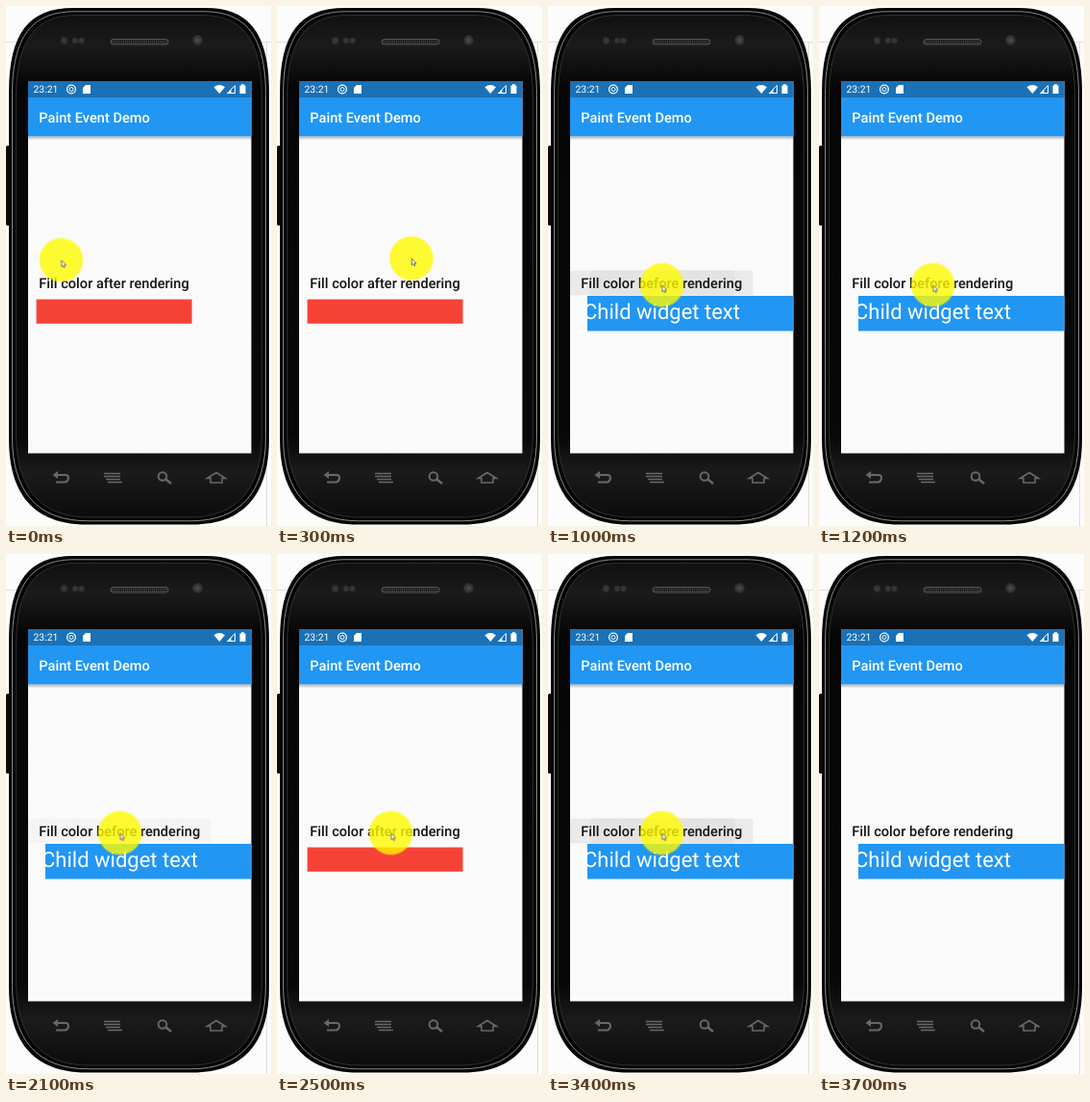
An HTML page for the animation above (4.8 s loop, 276 by 540 pixels).

```html
<!DOCTYPE html>
<html lang="en">
<head>
<meta charset="utf-8">
<title>Paint Event Demo</title>
<style>
html, body { margin: 0; width: 100%; height: 100%; overflow: hidden; background: #fafafa; }
svg { display: block; width: 100%; height: 100%; }
text { font-family: Roboto, sans-serif; text-rendering: geometricPrecision; }
.label { font-size: 14.6px; font-weight: 500; fill: #141414; }

.after, .before, .press, .splash, .pointer { animation: 4800ms step-end infinite; }
.after { animation-name: after; }
.before { animation-name: before; }
.press { animation-name: press; fill: #bcbcbc; }
.splash { animation-name: splash; fill: #c8c8c8; }
.pointer { animation-name: pointer; }

@keyframes after {
  0%, 47.91% { opacity: 1; }
  20.83%, 70.83%, 100% { opacity: 0; }
}
@keyframes before {
  0%, 47.91% { opacity: 0; }
  20.83%, 70.83%, 100% { opacity: 1; }
}
@keyframes press {
  0%, 25%, 52.08%, 77.08%, 100% { opacity: 0; }
  18.75%, 45.83% { opacity: .3; }
  20.83%, 47.91%, 70.83% { opacity: .26; }
  22.91%, 50%, 72.91% { opacity: .12; }
  43.75% { opacity: .09; }
  66.66% { opacity: .22; }
  68.75% { opacity: .36; }
  75% { opacity: .04; }
}
@keyframes splash {
  0%, 25%, 43.75%, 52.08%, 66.66%, 75%, 100% { opacity: 0; r: 0; }
  18.75%, 45.83%, 68.75% { opacity: .25; r: 48px; }
  20.83%, 47.91%, 70.83% { opacity: .2; r: 76px; }
  22.91%, 50%, 72.91% { opacity: .08; r: 100px; }
}
@keyframes pointer {
  0% { transform: translate(57.5px, 263.7px); opacity: 1; }
  2.08% { transform: translate(66px, 257px); }
  4.16% { transform: translate(95px, 255px); }
  6.25% { transform: translate(140px, 262px); }
  8.33% { transform: translate(168px, 274px); }
  10.41% { transform: translate(143px, 287px); }
  12.5% { transform: translate(121px, 290px); }
  14.58% { transform: translate(118.6px, 289.6px); opacity: 1; }
  77.08%, 100% { transform: translate(118.6px, 289.6px); opacity: 0; }
}
</style>
</head>
<body>
<svg viewBox="0 0 276 540">
  <defs>
    <path id="body" d="M3 90C3 28 24 2 70 2H208C253 2 274 28 274 90V450C274 508 247 538.500 194 538.500H84C30 538.500 3 508 3 450Z"/>
    <linearGradient id="panel" x2="0" y2="1">
      <stop offset="0" stop-color="#101010"/>
      <stop offset=".06" stop-color="#1b1b1b"/>
      <stop offset=".14" stop-color="#060606"/>
      <stop offset=".84" stop-color="#080808"/>
      <stop offset=".91" stop-color="#1b1b1b"/>
      <stop offset="1" stop-color="#0c0c0c"/>
    </linearGradient>
    <linearGradient id="shade" x2="0" y2="1">
      <stop offset="0" stop-opacity=".3"/>
      <stop offset="1" stop-opacity="0"/>
    </linearGradient>
    <radialGradient id="glow">
      <stop offset=".93" stop-color="#fffa00" stop-opacity=".8"/>
      <stop offset="1" stop-color="#fffa00" stop-opacity="0"/>
    </radialGradient>
    <pattern id="mesh" width="2" height="2" patternUnits="userSpaceOnUse">
      <rect width="2" height="2" fill="#1c1c1c"/>
      <rect width="1" height="1" fill="#555"/>
    </pattern>
    <clipPath id="afterButton"><rect x="23" y="274.5" width="179" height="26" rx="1.5"/></clipPath>
    <clipPath id="beforeButton"><rect x="23" y="274.5" width="190.5" height="26" rx="1.5"/></clipPath>
  </defs>

  <!-- Page behind the phone -->
  <rect width="276" height="540" fill="#fcfcfc"/>
  <path d="M0 37.5H276M271.5 38V540" stroke="#dedede"/>

  <!-- Phone -->
  <rect y="145" width="6" height="83" rx="1.5" fill="#0a0a0a"/>
  <use href="#body" fill="#050505"/>
  <g transform="translate(138.5 270.2)">
    <use href="#body" transform="scale(.974 .986) translate(-138.5 -270.2)" fill="none" stroke="#8d8d8d"/>
    <use href="#body" transform="scale(.944 .972) translate(-138.5 -270.2)" fill="url(#panel)" stroke="#3b3b3b" stroke-width=".8"/>
  </g>
  <g fill="#363636" stroke="#292929">
    <circle cx="60.500" cy="36" r="3.500"/>
    <circle cx="72" cy="36" r="3"/>
    <circle cx="78.500" cy="36" r="3"/>
    <circle cx="199.500" cy="35.500" r="5"/>
  </g>
  <circle cx="199.500" cy="35.500" r="2.200" fill="#484848"/>
  <rect x="109" y="34.500" width="60" height="5.500" rx="2.700" fill="url(#mesh)" stroke="#666" stroke-width=".8"/>

  <!-- Hardware buttons -->
  <g fill="none" stroke="#686868" stroke-width="2">
    <path d="M53 487H62Q65 487 65 490T62 494.500H52"/>
    <path d="M54 483L48.500 487L54 491Z" fill="#686868" stroke="none"/>
    <path d="M102 485.500H119M102 488.500H119M104 491.500H119M106 494.500H121" stroke-width="1.500"/>
    <circle cx="163" cy="488.500" r="4.300"/>
    <path d="M166.500 491.500L172 496" stroke-width="2.500"/>
    <path d="M209.500 490.500L219 484.500L228.500 490.500H225V495H213V490.500Z" stroke-width="1.600"/>
  </g>

  <!-- App -->
  <rect x="23" y="78" width="232.500" height="386.500" fill="#fafafa"/>
  <rect x="23" y="135.300" width="232.500" height="4" fill="url(#shade)"/>
  <rect x="23" y="95" width="232.500" height="40.300" fill="#2196f3"/>
  <rect x="23" y="78" width="232.500" height="17" fill="#1a71b6"/>
  <g fill="#fff">
    <text x="28.500" y="90.300" font-size="10.400">23:21</text>
    <circle cx="68" cy="86.500" r="4.400" fill="none" stroke="#fff" stroke-width="1.200"/>
    <circle cx="68" cy="86.500" r="2" fill="none" stroke="#fff"/>
    <path d="M83 82H88V91H80V85Z"/>
    <path d="M216.500 84.300Q222.300 79.500 228 84.300L222.300 91Z"/>
    <path d="M238.500 82.500V90.500H230.500Z" fill="none" stroke="#fff"/>
    <path d="M234.500 86.500V91H230Z"/>
    <path d="M243.500 82.500H245V81.300H248V82.500H249.500V91H243.500Z"/>
    <text x="34.300" y="121" font-size="14.600" font-weight="500">Paint Event Demo</text>
  </g>

  <g class="after">
    <g clip-path="url(#afterButton)">
      <rect class="press" x="23" y="274" width="179" height="27"/>
      <circle class="splash" cx="119" cy="288"/>
    </g>
    <text class="label" x="34.300" y="292.800">Fill color after rendering</text>
    <rect x="31.600" y="304.600" width="162" height="25.200" fill="#f44336"/>
  </g>
  <g class="before">
    <g clip-path="url(#beforeButton)">
      <rect class="press" x="23" y="274" width="191" height="27"/>
      <circle class="splash" cx="119" cy="288"/>
    </g>
    <text class="label" x="34.300" y="292.800">Fill color before rendering</text>
    <rect x="41" y="301" width="214.500" height="36.500" fill="#2196f3"/>
    <text x="37" y="325.300" font-size="22" fill="#fff">Child widget text</text>
  </g>

  <g class="pointer">
    <circle r="23.500" fill="url(#glow)"/>
    <path d="M.3 .3V7L1.800 5.700L2.900 8L4 7.500L3 5.200H5Z" fill="#fff" stroke="#444" stroke-width=".7"/>
  </g>
</svg>
</body>
</html>
```
